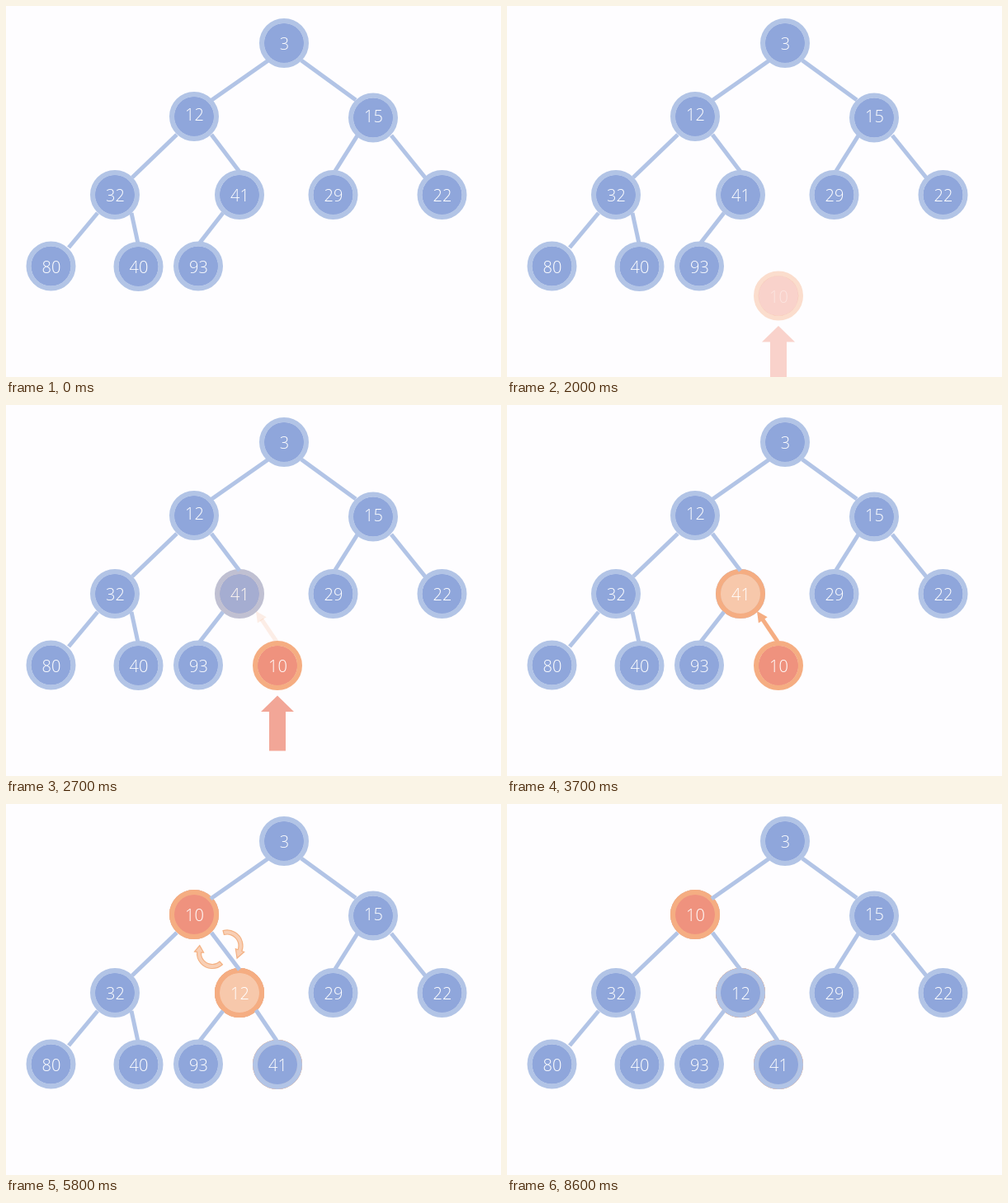
These frames come from a looping animation (600x450 px, 9500 ms). An HTML page with a canvas:

```html
<!DOCTYPE html>
<html lang="en">
<head>
<meta charset="utf-8">
<title>Min-heap insertion</title>
<style>
html, body { margin: 0; width: 100%; height: 100%; overflow: hidden; background: #fefdff; }
canvas { display: block; width: 600px; height: 450px; }
</style>
</head>
<body>
<canvas id="stage" width="600" height="450"></canvas>
<script>
const ctx = document.getElementById('stage').getContext('2d');
const LOOP = 9500, STEP = 100;
const BLUE = { rim: '#b2c4e6', fill: '#8fa6db' };
const PALE = { rim: '#f5ad82', fill: '#f7c8ab' };
const RED = { rim: '#f5ad82', fill: '#ef927e' };

// x, y, label, optional label offset
const still = [
  [337, 45, '3'], [445, 135.5, '15', -2], [132, 229, '32'], [396.5, 229, '29'],
  [528.5, 229, '22'], [54.5, 315.5, '80'], [160.5, 316, '40'], [233, 315.5, '93']
];
const top1 = [228, 134], mid = [283, 229], leaf = [329, 316];

const edges = [
  [318, 66, 248, 115], [358, 66, 424, 114], [207, 156, 153, 208],
  [249, 156, 283, 201], [426, 157, 399, 200], [467, 157, 508, 208],
  [111, 251, 76, 293], [152, 251, 160, 288], [263, 251, 235, 287]
];
const leafEdge = [303, 250, 328, 287];

let now = 0;
const ramp = (a, b) => Math.min(1, Math.max(0, (now - a) / (b - a)));

function faded(alpha, draw) {
  if (alpha <= 0) return;
  ctx.globalAlpha = alpha;
  draw();
  ctx.globalAlpha = 1;
}

function disc(x, y, r, color) {
  ctx.fillStyle = color;
  ctx.beginPath();
  ctx.arc(x, y, r, 0, Math.PI * 2);
  ctx.fill();
}

function ring(x, y, color) {
  ctx.strokeStyle = color;
  ctx.lineWidth = 6;
  ctx.beginPath();
  ctx.arc(x, y, 27, 0, Math.PI * 2);
  ctx.stroke();
}

function node([x, y], label, style, alpha = 1, dy = 1) {
  faded(alpha, () => {
    disc(x, y, 24.3, style.fill);
    ring(x, y, style.rim);
    ctx.fillStyle = '#fff';
    ctx.fillText(label, x + 0.5, y + dy + 7);
  });
}

function line([x1, y1, x2, y2], color, width) {
  ctx.strokeStyle = color;
  ctx.lineWidth = width;
  ctx.beginPath();
  ctx.moveTo(x1, y1);
  ctx.lineTo(x2, y2);
  ctx.stroke();
}

function polygon(points, color) {
  ctx.fillStyle = color;
  ctx.beginPath();
  points.forEach(p => ctx.lineTo(p[0], p[1]));
  ctx.fill();
}

// Arrow along an edge, pointing at its first end.
function edgeArrow([x, y, x2, y2], alpha) {
  faded(alpha, () => {
    const d = Math.hypot(x2 - x, y2 - y);
    const ux = (x2 - x) / d, uy = (y2 - y) / d;
    const bx = x + ux * 13, by = y + uy * 13;
    line([bx - ux, by - uy, x2, y2], PALE.rim, 5);
    polygon([[x, y], [bx - uy * 6.5, by + ux * 6.5], [bx + uy * 6.5, by - ux * 6.5]], PALE.rim);
  });
}

function upArrow(y, alpha) {
  faded(alpha, () => polygon([
    [329, y + 36.5], [349, y + 56], [339, y + 56], [339, y + 103.5],
    [319, y + 103.5], [319, y + 56], [309, y + 56]
  ], RED.fill));
}

function curl(cx, cy, r, from, to, tip) {
  const a = from * Math.PI / 180, b = to * Math.PI / 180;
  const at = k => [cx + k * Math.cos(b), cy + k * Math.sin(b)];
  const [hx, hy] = at(r);
  ctx.beginPath();
  ctx.arc(cx, cy, r + 2.5, a, b);
  ctx.lineTo(...at(r + 5.5));
  ctx.lineTo(hx - tip * Math.sin(b), hy + tip * Math.cos(b));
  ctx.lineTo(...at(r - 5.5));
  ctx.arc(cx, cy, r - 2.5, b, a, true);
  ctx.closePath();
  ctx.fillStyle = '#f8cfb5';
  ctx.strokeStyle = '#f4b183';
  ctx.lineWidth = 1.2;
  ctx.fill();
  ctx.stroke();
}

function swapSign(dx, dy, alpha) {
  faded(alpha, () => {
    curl(268 + dx, 172 + dy, 16.5, -105, 20, 10);
    curl(250 + dx, 181 + dy, 16, 48, 185, 8);
  });
}

function draw() {
  const enter = ramp(1600, 2600);
  const compare1 = ramp(2600, 3100);
  const swap1 = ramp(3700, 3900);
  const compare2 = ramp(4800, 5100);
  const swap2 = now >= 5800 ? 1 : 0;
  const compare3 = ramp(6500, 7100);
  const settle = ramp(7550, 8550);

  ctx.fillStyle = '#fefdff';
  ctx.fillRect(0, 0, 600, 450);
  ctx.font = '300 20px "Open Sans", "Noto Sans", sans-serif';
  ctx.textAlign = 'center';

  still.forEach(([x, y, label, dy]) => node([x, y], label, BLUE, 1, dy));

  node(top1, '12', BLUE, 1, -2);
  node(top1, '12', PALE, compare2, -2);
  node(top1, '10', RED, swap2);

  node(mid, '41', BLUE);
  node(mid, '41', PALE, compare1);
  node(mid, '10', RED, swap1);
  node(mid, '12', PALE, swap2);
  node(mid, '12', BLUE, compare3);

  if (now >= 1700) {
    const y = now > 2600 ? leaf[1] : 318.5 + (2600 - now) * 0.055;
    upArrow(y, enter * (1 - compare1));
    node([leaf[0], y], '10', RED, enter);
    node(leaf, '41', PALE, swap1);
    node(leaf, '41', BLUE, compare2);
  }

  edges.forEach(e => line(e, BLUE.rim, 5));
  faded(swap1, () => line(leafEdge, BLUE.rim, 5));

  edgeArrow(leafEdge, compare1 * (1 - swap1));
  edgeArrow([249, 156, 283, 201], compare2 * (1 - swap2));
  edgeArrow(edges[0], compare3 * (1 - settle));

  swapSign(51, 91, swap1 * (1 - compare2));
  swapSign(0, 0, swap2 * (1 - compare3));
}

const start = performance.now();
function tick() {
  const t = (performance.now() - start) % LOOP;
  now = Math.floor(t / STEP) * STEP;
  draw();
  requestAnimationFrame(tick);
}
tick();
</script>
</body>
</html>
```
